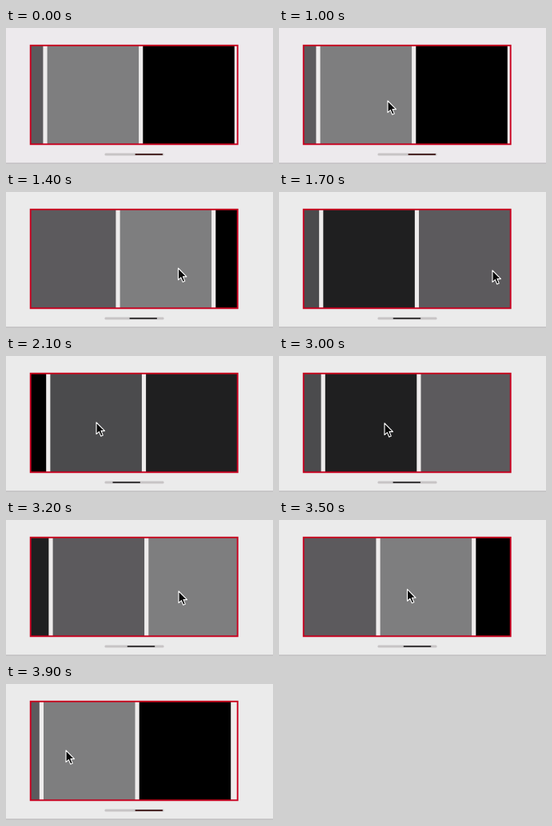
Recreate the animation shown at these times as an HTML page. Size 334 by 170 pixels, loop 4000 ms.

```html
<!DOCTYPE html>
<html lang="en">
<head>
<meta charset="utf-8">
<title>Drag carousel</title>
<style>
  html, body { margin: 0; width: 100%; height: 100%; overflow: hidden; background: #ebebeb; }
  svg { display: block; width: 334px; height: 170px; }
</style>
</head>
<body>
<svg viewBox="0 0 334 170">
  <defs>
    <clipPath id="window"><rect x="30.7" y="21.8" width="259" height="123.5"/></clipPath>
  </defs>
  <rect id="backdrop" width="334" height="170"/>
  <rect y="168.6" width="334" height="1" fill="#aaa8aa"/>
  <g clip-path="url(#window)">
    <rect x="30" y="21" width="261" height="126" fill="#eeecec"/>
    <g id="strip"></g>
  </g>
  <rect x="30.7" y="21.8" width="259" height="123.5" fill="none" stroke="#c9001f" stroke-width="1.9"/>
  <rect x="123.5" y="156.6" width="74" height="2.8" rx="1.2" fill="#c7c4c5"/>
  <rect id="thumb" y="157" width="34.8" height="2" rx="1"/>
  <path id="cursor" d="M0 0V14.6L3.4 11.6L5.8 17.2L8.3 16.1L6 10.6H10.5Z"
        fill="#080808" stroke="#fff" stroke-width="1.1" stroke-linejoin="round"/>
</svg>
<script>
const LOOP = 4000, STEP = 100, ENTER = 500;
const PITCH = 119.7, PANEL = 114.5;
const SCROLL_START = 37.3, SCROLL_END = -427.2;
const colors = ['#000', '#4b4b4d', '#1f1f20', '#5c5a5d', '#7e7e7f', '#000'];

// Rest points of the strip's left edge; each move between them is eased.
const scrollStops = [
  { t: 1060, x: SCROLL_END }, { t: 2100, x: -64.3 }, { t: 2700, x: SCROLL_START },
  { t: 3200, x: -300.5 }, { t: 3900, x: -431.8 }
];
// Turning points of the pointer tip.
const pointerStops = [
  { t: ENTER, x: 150, y: 164 }, { t: 1000, x: 136, y: 91 }, { t: 1700, x: 267, y: 98 },
  { t: 2100, x: 113, y: 83 }, { t: 2700, x: 263, y: 97 }, { t: 3000, x: 132, y: 84 },
  { t: 3200, x: 216, y: 89 }, { t: 3900, x: 75, y: 83 }
];

const get = id => document.getElementById(id);
const strip = get('strip'), thumb = get('thumb');
const cursor = get('cursor'), backdrop = get('backdrop');
const clamp = v => Math.min(1, Math.max(0, v));
const ease = u => u * u * (3 - 2 * u);

colors.forEach((color, i) => {
  const panel = document.createElementNS('http://www.w3.org/2000/svg', 'rect');
  const attrs = { x: i * PITCH, y: 21, width: PANEL, height: 126, fill: color };
  for (const name in attrs) panel.setAttribute(name, attrs[name]);
  strip.append(panel);
});

function follow(stops, t, axis) {
  let value = stops[0][axis];
  for (let i = 1; i < stops.length; i++) {
    const a = stops[i - 1], b = stops[i];
    value += (b[axis] - a[axis]) * ease(clamp((t - a.t) / (b.t - a.t)));
  }
  return value;
}

function draw(time) {
  const t = Math.floor((time % LOOP) / STEP) * STEP;
  const left = follow(scrollStops, t, 'x');
  const progress = clamp((SCROLL_START - left) / (SCROLL_START - SCROLL_END));
  strip.setAttribute('transform', `translate(${left} 0)`);
  thumb.setAttribute('x', 125.4 + 36 * progress);
  thumb.setAttribute('fill', progress > 0.99 ? '#4b2828' : '#3d3b3c');
  backdrop.setAttribute('fill', t <= 1000 ? '#edeaed' : '#ebebeb');
  cursor.setAttribute('visibility', t < ENTER ? 'hidden' : 'visible');
  cursor.setAttribute('transform',
    `translate(${follow(pointerStops, t, 'x')} ${follow(pointerStops, t, 'y')})`);
}

const start = performance.now();
function tick() {
  draw(performance.now() - start);
  requestAnimationFrame(tick);
}
tick();
</script>
</body>
</html>
```
